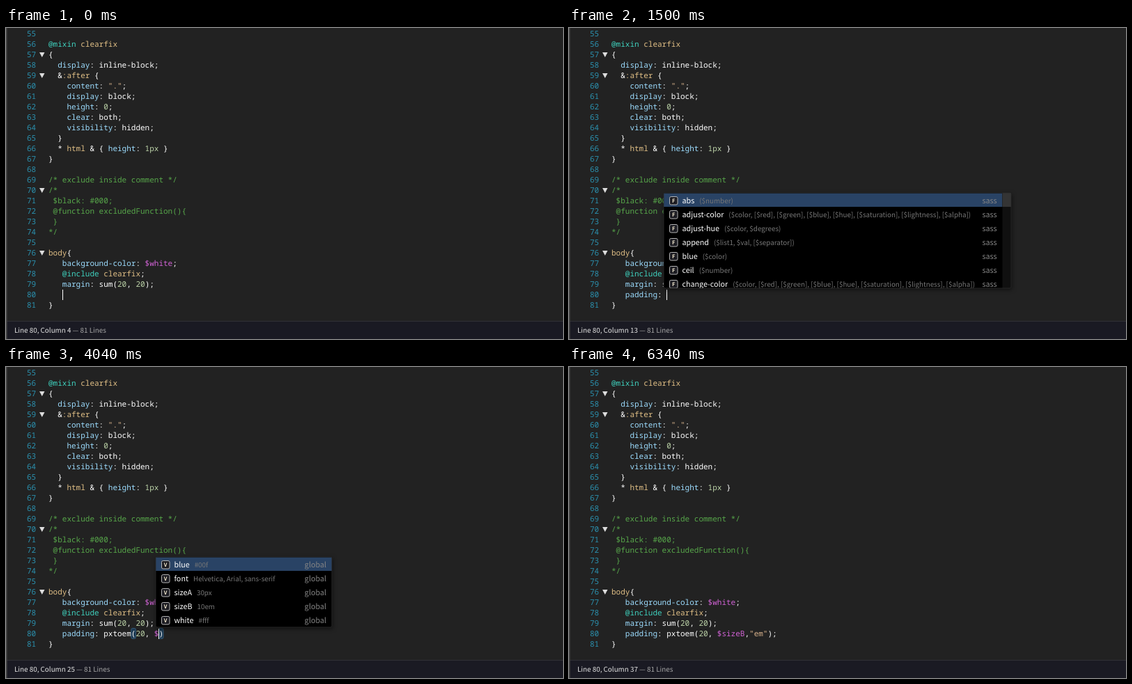
An HTML page for the animation above (6.69 s loop, 800 by 447 pixels).

```html
<!DOCTYPE html>
<html lang="en">
<head>
<meta charset="utf-8">
<title>SCSS code hints</title>
<style>
html, body { margin: 0; height: 100%; overflow: hidden; background: #222; }
#stage { display: block; width: 100vw; height: 100vh; }
text { white-space: pre; text-rendering: geometricPrecision; fill: #fff;
  font-family: "Noto Sans CJK JP", "Noto Sans CJK SC", "Noto Sans CJK", "Open Sans", sans-serif; }
.code { font: 11px "Noto Sans Mono", "DejaVu Sans Mono", monospace; }
.num { fill: #2b91af; }
.comment { fill: #57a64a; }
.key { fill: #3fd0bd; }
.var { fill: #d062d4; }
.str { fill: #d9b38c; }
.val { fill: #bcd3a8; }
.prop { fill: #9cdcfe; }
.tag { fill: #dfbe85; }
.name { font-size: 10.74px; font-weight: 500; }
.args { font-size: 9.85px; font-weight: 400; fill: #777; }
.from { font-size: 10.74px; fill: #858585; text-anchor: end; }
.icon { font-size: 7.5px; font-weight: 700; fill: #f3e9cf; text-anchor: middle; }
.tip { font-size: 11.64px; }
.status { font-size: 9.85px; font-weight: 500; fill: #e4e4e4; }
.status tspan { font-weight: 400; fill: #a5a5a5; }
.shadow { filter: drop-shadow(1px 2px 3px rgba(0, 0, 0, .6)); }
</style>
</head>
<body>
<svg id="stage" viewBox="0 0 800 447" preserveAspectRatio="none">
  <g id="page"></g>
  <g id="live"></g>
</svg>
<script>
const LOOP = 6690, X0 = 61, CHAR = 6.6, FIRST = 55, LINE = 80;
const byId = id => document.getElementById(id);
const colX = n => X0 + n * CHAR;
const lineY = n => 1 + (n - FIRST) * 15;
const rect = (x, y, w, h, fill, more = '') =>
  `<rect x="${x}" y="${y}" width="${w}" height="${h}" fill="${fill}" ${more}/>`;
const text = (x, y, cls, body) => `<text x="${x}" y="${y}" class="${cls}">${body}</text>`;
const span = (cls, body) => `<tspan class="${cls}">${body}</tspan>`;

// ---- code ----
const source = `
@mixin clearfix
{
  display: inline-block;
  &:after {
    content: ".";
    display: block;
    height: 0;
    clear: both;
    visibility: hidden;
  }
  * html & { height: 1px }
}

/* exclude inside comment */
/*
 $black: #000;
 @function excludedFunction(){
 }
*/

body{
   background-color: $white;
   @include clearfix;
   margin: sum(20, 20);

}`.split('\n');
const folds = [57, 59, 70, 76];
const inComment = n => n >= 69 && n <= 74;

const tokens = /(@\w+)|(\$\w*)|("[^"]*")|(\b\d+\w*)|([\w-]+(?=:))|(clearfix|html|body|:after|^pa?$)/g;
const kinds = ['key', 'var', 'str', 'val', 'prop', 'tag'];
const paint = code => code.replace(tokens, (all, ...groups) =>
  span(kinds[groups.findIndex((g, i) => i < 6 && g !== undefined)], all));

function codeLine(n, code) {
  const body = code.trim(), indent = code.length - code.trimStart().length;
  const y = lineY(n) + 11;
  return inComment(n)
    ? text(colX(indent), y, 'code comment', body)
    : text(colX(indent), y, 'code', paint(body));
}

// ---- hint lists ----
const props = ['padding', 'padding-bottom', 'padding-left', 'padding-right', 'padding-top',
  'page-break-after', 'page-break-before'].map(name => [name]);
const colorArgs = '($color, [$red], [$green], [$blue], [$hue], [$saturation], [$lightness], [$alpha])';
const sass = (name, args) => [name, args, 'sass'];
const builtins = [
  sass('abs', '($number)'),
  sass('adjust-color', colorArgs),
  sass('adjust-hue', '($color, $degrees)'),
  sass('append', '($list1, $val, [$separator])'),
  sass('blue', '($color)'),
  sass('ceil', '($number)'),
  sass('change-color', colorArgs)
];
const pxtoem = ['pxtoem', '($px, $parent: 16, $unit: "em")', 'import-content.scss'];
const withP = [
  sass('percentage', '($value)'),
  pxtoem,
  sass('append', '($list1, $val, [$separator])'),
  sass('comparable', '($number1, $number2)'),
  sass('complement', '($color)'),
  sass('opacify', '($color, $amount)'),
  sass('opacity', '($color)')
];
const global = (name, value) => [name, value, 'global'];
const sizes = [global('sizeA', '30px'), global('sizeB', '10em')];
const vars = [global('blue', '#00f'), global('font', 'Helvetica, Arial, sans-serif'),
  ...sizes, global('white', '#fff')];

// A list opens below the line when it fits, otherwise above it.
function menu(cursorX, { rows, w, icon, thumb = 0, sel = 0 }) {
  const pitch = icon ? 20 : 19, rowW = thumb ? w - 12.5 : w;
  const h = thumb ? 137 : rows.length * pitch + 1;
  const x = Math.round(cursorX - 4.5), y = rows.length < 3 ? 391.5 : 374 - h;
  const items = rows.map(([name, args, from], i) => {
    const top = i * pitch, base = top + 15;
    let out = i === sel ? rect(0, top + .5, rowW, pitch - .5, '#294365') : '';
    if (icon) out += rect(8.5, top + 5.5, 11.5, 11.5, '#1c1c22', 'rx="2" stroke="#b5b5b5"')
      + text(14.2, top + 14, 'icon', icon);
    out += text(icon ? 26.5 : 12.5, base, 'name',
      name + (args ? `<tspan class="args" dx="7">${args}</tspan>` : ''));
    return out + (from ? text(rowW - 8, base, 'from', from) : '');
  }).join('');
  const bar = thumb ? rect(rowW, 0, w - rowW, h, '#101010') + rect(rowW, 0, w - rowW, thumb, '#343434') : '';
  return rect(x, y, w, h, '#000', 'rx="2" class="shadow"')
    + `<svg x="${x}" y="${y}" width="${w}" height="${h}">${items}${bar}</svg>`
    + rect(x, y, w, h, 'none', 'rx="2" stroke="#2b2b2b" stroke-width=".8"');
}

const params = ['$px', '$parent: 16', '$unit: "em"'];
const tooltip = active => rect(180.5, 350.5, 170, 21.5, '#000', 'rx="3" stroke="#1b1b1b" class="shadow"')
  + text(187, 365, 'tip', params.map((p, i) =>
    i === active ? `<tspan font-weight="700">${p}</tspan>` : p).join(', '));

// ---- timeline: start, typed line with | as cursor, extras ----
const call = '   padding: pxtoem(';
const steps = [
  [0, '   |'],
  [350, '   p|', { list: { rows: props, w: 161, thumb: 20 } }],
  [750, '   pa|', { list: { rows: props, w: 161, thumb: 29 } }],
  [1150, '   padding: |', { list: { rows: [['inherit']], w: 161 } }],
  [1500, '   padding: |', { list: { rows: builtins, w: 499, icon: 'F', thumb: 20 } }],
  [1880, '   padding: p|', { list: { rows: withP, w: 340, icon: 'F', thumb: 40 } }],
  [2260, '   padding: px|', { list: { rows: [pxtoem], w: 340, icon: 'F' } }],
  [2640, call + '|)', { tip: 0 }],
  [2990, call + '2|)', { tip: 0 }],
  [3140, call + '20|)', { tip: 0 }],
  [3290, call + '20,|)', { tip: 1 }],
  [3690, call + '20, |)', { tip: 1 }],
  [4040, call + '20, $|)', { list: { rows: vars, w: 253, icon: 'V' } }],
  [4390, call + '20, $s|)', { list: { rows: sizes, w: 253, icon: 'V' }, blink: true }],
  [4740, call + '20, $s|)', { list: { rows: sizes, w: 253, icon: 'V', sel: 1 } }],
  [5090, call + '20, $sizeB|)'],
  [5440, call + '20, $sizeB,|)', { tip: 2 }],
  [5590, call + '20, $sizeB,"|")', { tip: 2 }],
  [5740, call + '20, $sizeB,"e|")', { tip: 2 }],
  [5890, call + '20, $sizeB,"em|")', { tip: 2 }],
  [6040, call + '20, $sizeB,"em"|)', { tip: 2 }],
  [6190, call + '20, $sizeB,"em")|'],
  [6340, call + '20, $sizeB,"em");|', { blink: true }]
];

function drawStep([, typed, { list, tip, blink } = {}]) {
  const [before, after] = typed.split('|'), code = before + after;
  const cursorX = colX(before.length), y = lineY(LINE);
  const bracket = i => rect(colX(i), y - .5, CHAR, 15, '#1d3a52', 'rx="2" stroke="#3a6485" stroke-width=".8"');
  let out = '';
  if (after[0] === ')' || before.endsWith(')'))
    out += bracket(code.indexOf('(')) + bracket(code.indexOf(')'));
  out += codeLine(LINE, code);
  if (!blink) out += rect(Math.round(cursorX), y, 1, 15, '#fff');
  if (tip !== undefined) out += tooltip(tip);
  out += text(12, 438, 'status', `Line ${LINE}, Column ${before.length + 1} <tspan>— 81 Lines</tspan>`);
  if (list) out += menu(cursorX, list);
  return out;
}

byId('page').innerHTML = rect(0, 0, 800, 447, '#222')
  + rect(0, 421, 800, 26, '#1a1a23') + rect(0, 421, 800, 1, '#303036')
  + rect(0, 0, 1.5, 447, '#4a4a4a')
  + source.map((code, i) => {
    const n = FIRST + i;
    return text(30, lineY(n) + 11, 'code num', n) + codeLine(n, code);
  }).join('')
  + folds.map(n => `<path d="M48 ${lineY(n) + 4}h7.5l-3.75 7z" fill="#ddd"/>`).join('');

let shown;
function frame() {
  const t = performance.now() % LOOP;
  const step = steps.findLast(([start]) => start <= t);
  if (step !== shown) byId('live').innerHTML = drawStep(shown = step);
  requestAnimationFrame(frame);
}
frame();
</script>
</body>
</html>
```
